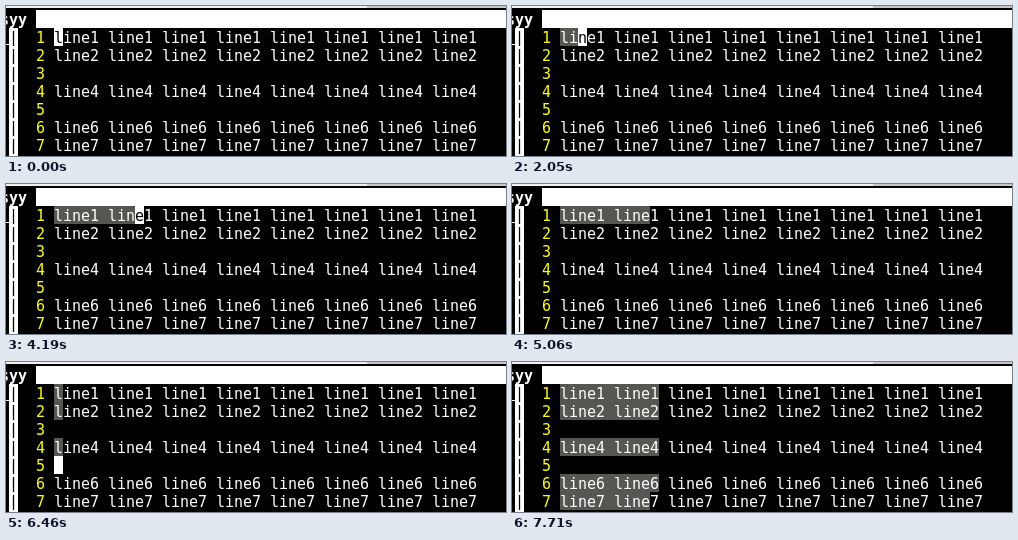
Write an HTML page with a canvas that moves like this. It is 500 px wide and 150 px high and loops after 8000 ms.

```html
<!DOCTYPE html>
<html lang="en">
<head>
<meta charset="utf-8">
<title>Block selection</title>
<style>
  html, body { margin: 0; width: 100%; height: 100%; overflow: hidden; background: #000; }
  canvas { display: block; }
</style>
</head>
<body>
<canvas id="stage" width="500" height="150"></canvas>
<script>
const ctx = document.getElementById('stage').getContext('2d');
const LOOP = 8000, CELL_W = 9, CELL_H = 18, LEFT = 48, TOP = 22;
const FONT = '15px "DejaVu Sans Mono", monospace';
const WHITE = '#fff', BLACK = '#000', YELLOW = '#ff0', SELECTED = '#555753';

const lines = [1, 2, 3, 4, 5, 6, 7].map(n =>
  n === 3 || n === 5 ? '' : Array(8).fill('line' + n).join(' '));

// Cursor states: start time, row, column, visible
const steps = [
  [0, 0, 0, true], [200, 0, 0, false], [800, 0, 0, true], [1390, 0, 0, false],
  ...[1710, 2050, 2370, 2690, 2980, 3300, 3640, 3940, 4190, 4490]
    .map((time, i) => [time, 0, i + 1, true]),
  [5060, 0, 10, false],
  ...[5470, 5780, 6130, 6460, 6810, 7140]
    .map((time, i) => [time, i + 1, lines[i + 1] ? 10 : 0, true]),
  [7710, 6, 10, false]
];

const cellX = col => LEFT + col * CELL_W;
const cellY = row => TOP + row * CELL_H;

function box(x, y, w, h, color) {
  ctx.fillStyle = color;
  ctx.fillRect(x, y, w, h);
}

function fillCells(row, col, count, color) {
  box(cellX(col), cellY(row), count * CELL_W, CELL_H, color);
}

function write(text, row, col, color, weight = '') {
  ctx.font = weight + ' ' + FONT;
  ctx.fillStyle = color;
  [...text].forEach((char, i) => ctx.fillText(char, cellX(col + i), cellY(row) + 15));
}

function drawFrame() {
  box(0, 0, 500, 150, BLACK);
  box(0, 0, 500, 2, '#f2f1f0');
  box(361, 0, 139, 2, '#c8c7c6');
  fillCells(-1, -2, 53, WHITE);
  write('syy', -1, -6, WHITE, 'bold');
  box(0, 38, 3, 1, WHITE);
  for (let row = 0; row < 8; row++) {
    fillCells(row, -5, 1, WHITE);
    write('|', row, -5, BLACK);
  }
}

function draw(time) {
  const [, cursorRow, cursorCol, visible] = steps.findLast(step => step[0] <= time);
  drawFrame();
  lines.forEach((text, row) => {
    write(String(row + 1), row, -2, YELLOW);
    if (row <= cursorRow && text) {
      const count = cursorCol + (row < cursorRow ? 1 : 0);
      fillCells(row, 0, count, SELECTED);
    }
    write(text, row, 0, WHITE);
  });
  if (visible) {
    fillCells(cursorRow, cursorCol, 1, WHITE);
    write(lines[cursorRow][cursorCol] || '', cursorRow, cursorCol, BLACK);
  }
}

function tick() {
  draw(performance.now() % LOOP);
  requestAnimationFrame(tick);
}
tick();
</script>
</body>
</html>
```
